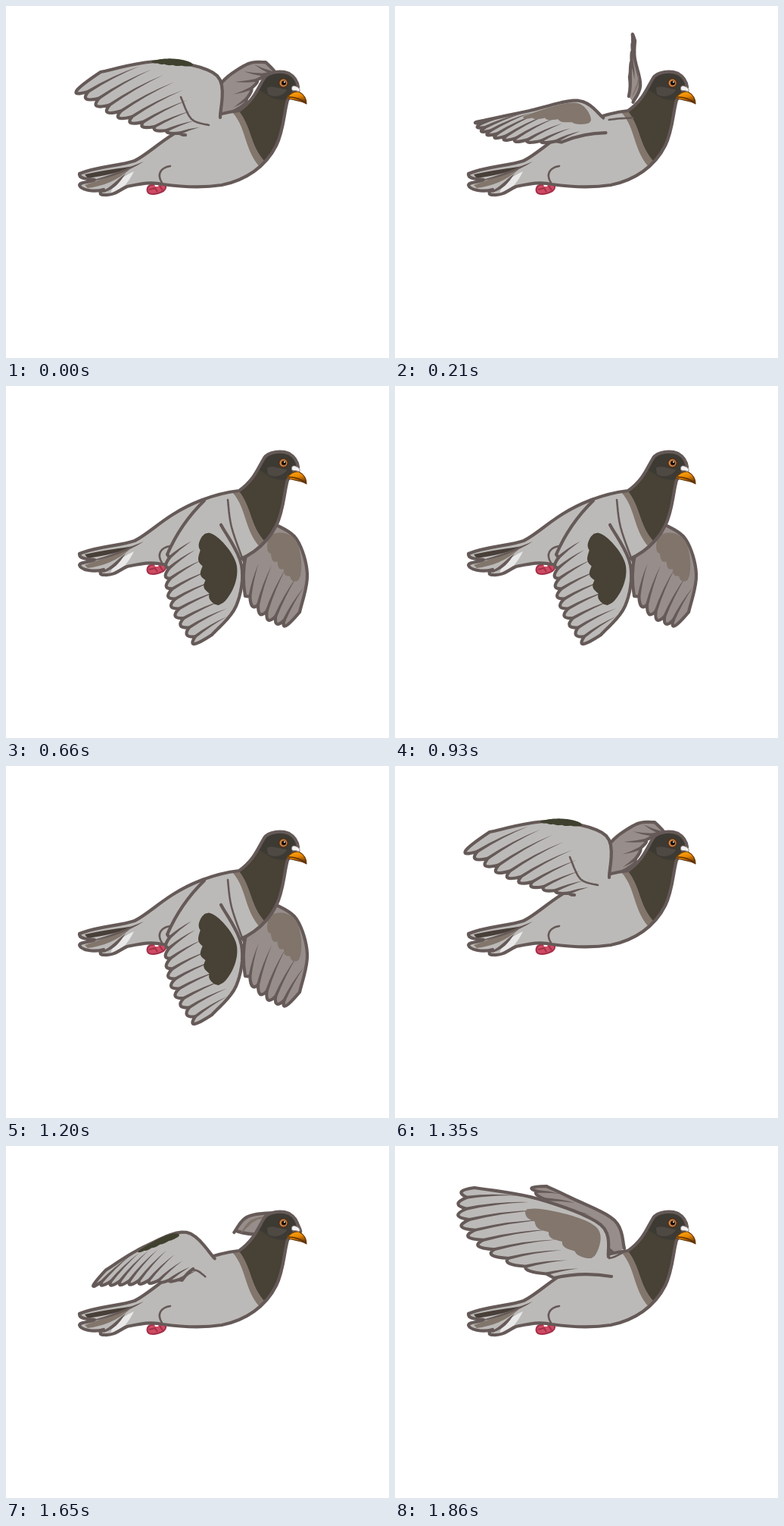
Write an HTML page that moves like this. It is 506 by 464 pixels and loops after 1.89 s.

```html
<!DOCTYPE html>
<html lang="en">
<head>
<meta charset="utf-8">
<title>Flying pigeon</title>
<style>
  html, body { margin: 0; width: 100%; height: 100%; overflow: hidden; background: #fff; }
  svg { display: block; width: 506px; height: 464px; }
  .line { fill: none; stroke: #655a58; stroke-width: 4.2; stroke-linejoin: round; stroke-linecap: round; }
  .thin { stroke-width: 2.6; }
  .ink { fill: #655a58; }
</style>
</head>
<body>
<svg viewBox="0 0 506 464">
  <defs>
    <linearGradient id="beak" x1="0" y1="0" x2="0.5" y2="1">
      <stop offset="0" stop-color="#ffb01c"/>
      <stop offset="0.55" stop-color="#e98600"/>
      <stop offset="1" stop-color="#6f3a06"/>
    </linearGradient>
    <path id="outline" d="M97,221 C122,211 150,211 170,204 C186,196 200,182 221,169 C240,157 272,142 308,138
      C328,124 333,108 341,95 C347,86 364,85 374,89 C381,93 385,99 386,107 L372,124
      C367,142 367,164 357,184 C343,212 316,230 285,236 C260,240 235,239 207,235
      C190,231 175,235 160,238 C150,242 144,250 130,249 C122,249 124,245 129,242
      C115,246 98,242 97,236 C98,232 108,233 117,229 C108,228 96,228 97,221Z"/>
    <clipPath id="inside"><use href="#outline"/></clipPath>
  </defs>
  <g id="far"></g>
  <g id="body">
    <g stroke="#a32f49" stroke-width="2" fill="#cf4b63" stroke-linejoin="round">
      <path d="M191,236 C186,238 185,244 189,247 C194,249 202,247 208,244 C212,241 212,237 209,234Z"/>
      <path fill="none" d="M189,242 L197,240 L200,245 M203,237 L207,243"/>
    </g>
    <path d="M196,235h6l-1,3h-4z" fill="#fff"/>
    <use href="#outline" fill="#bcbab8"/>
    <g clip-path="url(#inside)">
      <path fill="#483f38" d="M104,222 C130,216 150,214 170,211 C150,220 128,224 108,227Z"/>
      <path fill="#82766c" d="M104,236 C122,230 140,222 164,215 C148,230 126,238 108,240Z"/>
      <path fill="#e9e8e8" d="M138,247 C142,234 152,226 169,218 C163,231 154,242 143,246Z"/>
      <path class="ink" d="M112,230 C138,224 158,214 182,205 C160,219 138,226 114,231Z
        M127,244 C140,238 145,230 158,221 C149,234 144,241 129,246Z"/>
      <path fill="#82766c" d="M295,136 C319,158 313,188 336,213 L400,200 V80 H300Z"/>
      <path fill="#474136" d="M304,134 C326,158 321,183 343,206 L400,200 V70 H300Z"/>
      <path fill="#3d3a34" d="M330,108 C340,84 368,82 388,96 V116 C378,126 356,126 345,117Z"/>
      <path fill="#4e4a43" d="M345,108 C352,104 360,109 371,110 C368,118 354,122 346,116Z"/>
    </g>
    <use href="#outline" class="line"/>
    <path class="line thin" d="M217,211 C204,213 199,222 206,233"/>
    <circle cx="366.5" cy="101.5" r="7" fill="#4a3322"/>
    <circle cx="366.5" cy="101.5" r="5" fill="#cb8040"/>
    <circle cx="367" cy="101.5" r="3" fill="#160b06"/>
    <circle cx="368" cy="100.3" r="1" fill="#fff"/>
    <path fill="url(#beak)" stroke="#6b3b0c" stroke-width="1.2" stroke-linejoin="round"
      d="M371,121 C375,116 381,112 387,113 C394,117 397,122 397,129 C390,124 380,125 371,121Z"/>
    <path fill="none" stroke="#59300a" stroke-width="1.4" d="M373,120 C381,120 389,122 396,128"/>
    <path fill="#f4f2f1" stroke="#8b8482" d="M378,111 C376,106 380,104 383,106 C387,107 390,111 387,113 C384,111 380,112 378,111Z"/>
  </g>
  <g id="near"></g>
</svg>
<script>
const TICK = 30, TICKS = 63, BEAT = 9;

const points = s => s.split(' ').map(p => p.split(',').map(Number));
const lerp = (a, b, u) => a.map((v, i) => v + (b[i] - v) * u);
const steps = (n, f) => Array.from({ length: n + 1 }, (_, i) => f(i / n));

// A wing needs a leading edge, the arc its feather tips lie on and the end of its trailing edge.
// The patch is [from, to] along the lead, then centre and half width across the wing.
const pose = (lead, tips, end, patch, tint, crease = '') => ({
  shape: { lead: points(lead), tips: points(tips), end: points(end), crease: crease ? points(crease) : [] },
  patch, tint
});

const wings = {
  near: {
    feathers: 9, fill: '#bcbab8', pivot: [285, 148], seam: -1.05, foldDown: 0.15, foldUp: 0.2,
    glide: pose('283,147 279,92 205,73 125,87', '93,112 157,151 234,170', '237,170',
      [0.5, 0.72, 0, 0.06], '#40402f', '231,120 245,149 268,157'),
    low: pose('284,183 311,236 304,290 272,328', '249,340 216,284 213,222', '262,151',
      [0, 0.63, 0.3, 0.24], '#474136', '293,150 298,186 314,232'),
    raised: pose('282,146 272,104 190,70 105,55', '88,60 103,126 210,174', '286,172',
      [0.06, 0.62, 0.25, 0.2], '#82766d', '283,148 290,146 300,141')
  },
  far: {
    feathers: 5, fill: '#978d8a', pivot: [318, 143], seam: -3.98, foldDown: 0.25, foldUp: 0.49,
    glide: pose('281,140 283,104 318,77 343,74', '356,88 335,97 317,128', '290,143',
      [0, 0.6, 0.22, 0], '#80746b'),
    low: pose('355,182 384,202 398,248 388,298', '370,316 341,305 316,277', '317,222',
      [0, 0.62, 0.22, 0.2], '#80746b'),
    raised: pose('303,135 290,98 232,68 200,53', '181,55 205,82 260,125', '290,142',
      [0, 0.6, 0.22, 0], '#80746b')
  }
};

// Point at u on a smooth curve through evenly timed points.
function spline(pts, u) {
  const n = pts.length - 1, i = Math.min(n - 1, Math.floor(u * n)), t = u * n - i;
  const at = k => pts[Math.max(0, Math.min(n, k))];
  const [p, a, b, q] = [at(i - 1), at(i), at(i + 1), at(i + 2)];
  return a.map((v, k) => v + t / 2 * (b[k] - p[k] + t * (2 * p[k] - 5 * v + 4 * b[k] - q[k]
    + t * (3 * (v - b[k]) + q[k] - p[k]))));
}

// Point at u on the parabola through three points.
const arc = ([a, m, b], u) => a.map((v, k) =>
  v * (1 - u) * (1 - 2 * u) + 4 * m[k] * u * (1 - u) + b[k] * u * (2 * u - 1));

// Midpoint of a and b pushed sideways by a share of their distance.
const bow = (a, b, share) => [
  (a[0] + b[0]) / 2 + (b[1] - a[1]) * share,
  (a[1] + b[1]) / 2 - (b[0] - a[0]) * share
];

function taper(a, b) {
  const len = Math.hypot(b[0] - a[0], b[1] - a[1]) || 1, w = 2 / len;
  const edge = side => lerp(a, bow(a, [2 * a[0] - b[0], 2 * a[1] - b[1]], 0), 0).map((v, k) =>
    v + side * w * (k ? a[0] - b[0] : b[1] - a[1]));
  return `M${edge(1)}Q${bow(a, b, 0.05 + w * 0.6)} ${b}Q${bow(a, b, 0.05 - w * 0.6)} ${edge(-1)}Z`;
}

function patchPath(lead, tips, [from, to, centre, half]) {
  const side = sign => s => {
    const u = from + (to - from) * s;
    const round = Math.sin(Math.PI * s) ** 0.5;
    const scallop = sign > 0 ? 0.8 + 0.2 * Math.abs(Math.sin(5 * Math.PI * s)) : 1;
    return lerp(spline(lead, u), arc(tips, 1 - u), centre + sign * half * round * scallop);
  };
  return `M${[...steps(40, side(-1)), ...steps(40, side(1)).reverse()].join('L')}Z`;
}

function drawWing({ feathers, fill }, { shape, patch, tint }) {
  const { lead, tips, end: [end], crease } = shape;
  const tip = steps(feathers, s => arc(tips, s));
  // Feather lines run from the gaps towards the leading edge and shorten near the body.
  const fade = steps(feathers - 1, s =>
    lerp(arc(tips, s), spline(lead, 0.72 * (1 - s)), 0.85 - 0.4 * s));
  const gaps = fade.map((f, i) => lerp(lerp(tip[i], tip[i + 1], 0.5), f, 0.12));
  const edge = [lead.at(-1), ...gaps];
  let d = `M${steps(24, u => spline(lead, u)).join('L')}`;
  for (let i = 0; i < feathers; i++) {
    const mid = lerp(edge[i], edge[i + 1], 0.5);
    d += `Q${tip[i].map((v, k) => 2 * v - mid[k])} ${edge[i + 1]}`;
  }
  d += `L${tip[feathers]}Q${bow(tip[feathers], end, 0.1)} ${end}`;
  const slits = gaps.map((g, i) => taper(g, fade[i])).join('');
  const fold = crease.length ? `M${steps(12, u => spline(crease, u)).join('L')}` : '';
  return `<path d="${d}Z" fill="${fill}"/><path class="ink" d="${slits}"/><path class="line" d="${d}"/>
    <path d="${patchPath(lead, tips, patch)}" fill="${tint}"/><path class="line thin" d="${fold}"/>`;
}

// Swing every point around the shoulder, foreshortened in mid-stroke.
function swing({ pivot: [cx, cy], seam }, a, b, u, fold) {
  const scale = 1 - 4 * u * (1 - u) * fold, turn = 2 * Math.PI;
  const polar = ([x, y]) => {
    const angle = Math.atan2(y - cy, x - cx) - seam;
    return [Math.hypot(x - cx, y - cy), seam + (angle + turn) % turn];
  };
  const move = (p, q) => {
    const [r, t] = lerp(polar(p), polar(q), u);
    return [cx + r * scale * Math.cos(t), cy + r * scale * Math.sin(t)];
  };
  const shape = {};
  for (const k in a.shape) shape[k] = a.shape[k].map((p, i) => move(p, b.shape[k][i]));
  return { shape, patch: lerp(a.patch, b.patch, u), tint: (u < 0.5 ? a : b).tint };
}

// Glide, four ticks down, four ticks up.
function poseAt(wing, phase) {
  const { glide, low, raised, foldDown, foldUp } = wing;
  return phase <= 4 ? swing(wing, glide, low, phase / 4, foldDown)
                    : swing(wing, low, raised, (phase - 4) / 4, foldUp);
}

const frames = Array.from({ length: BEAT }, (_, phase) => Object.entries(wings).map(([id, wing]) => {
  const group = document.createElementNS('http://www.w3.org/2000/svg', 'g');
  group.innerHTML = drawWing(wing, poseAt(wing, phase));
  group.style.display = 'none';
  document.getElementById(id).append(group);
  return group;
}));

const start = performance.now();
function loop() {
  const tick = Math.floor((performance.now() - start) / TICK) % TICKS;
  const phase = tick === 1 ? 0 : tick % BEAT;   // the first pose holds for two ticks
  frames.forEach((groups, i) => groups.forEach(g => { g.style.display = i === phase ? '' : 'none'; }));
  requestAnimationFrame(loop);
}
loop();
</script>
</body>
</html>
```
